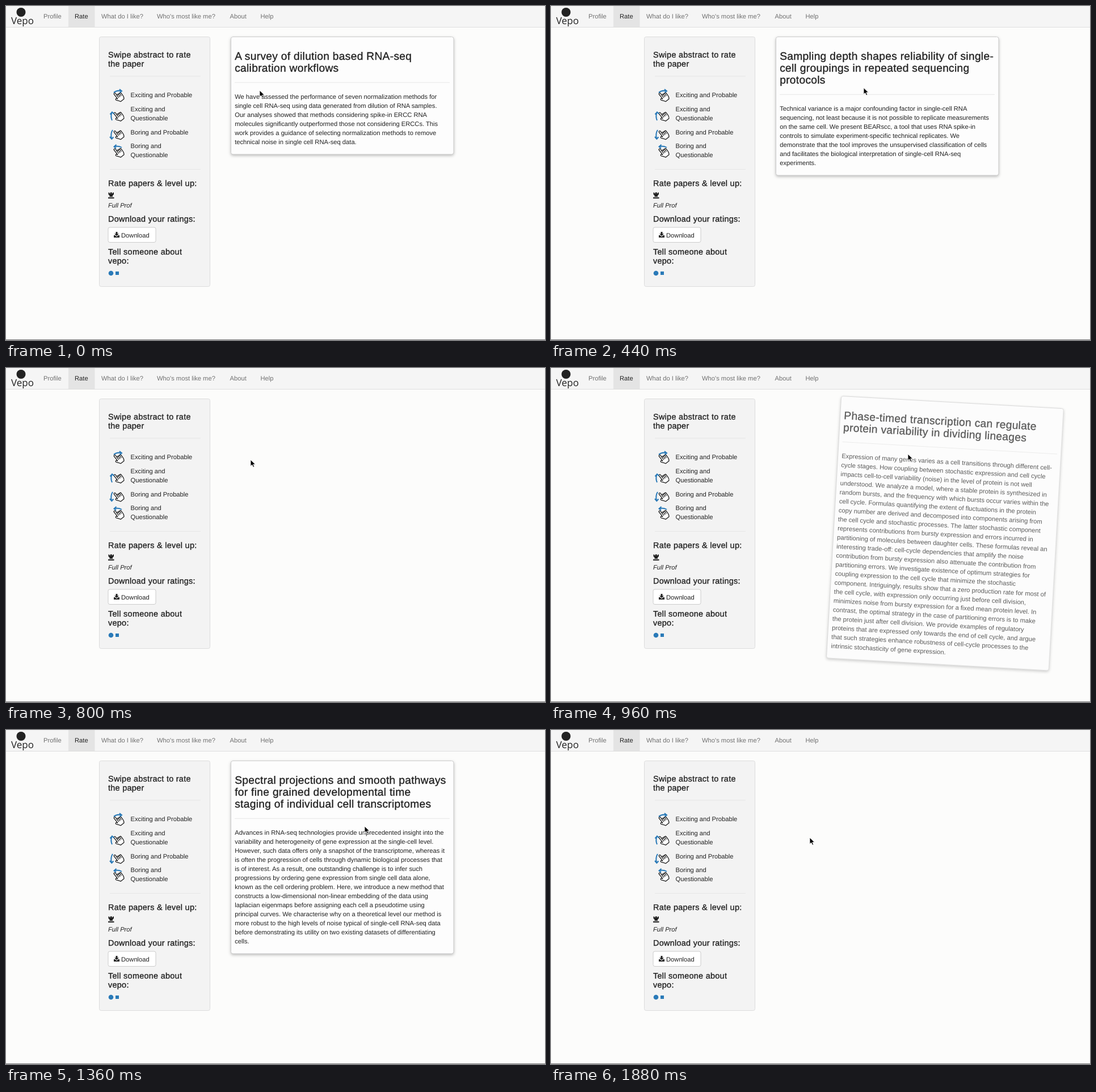
These frames come from a looping animation (950x590 px, 1920 ms). An HTML page:

```html
<!DOCTYPE html>
<html lang="en">
<head>
<meta charset="utf-8">
<title>Swipe to rate</title>
<style>
html, body { margin: 0; width: 100%; height: 100%; overflow: hidden; background: #fcfcfb; }
svg { display: block; }
text { font: 11.2px "Liberation Sans", Arial, sans-serif; fill: #222; white-space: pre; text-rendering: geometricPrecision; }
.h3, .h4 { stroke: #222; stroke-width: .35px; letter-spacing: .3px; }
.h3 { font-size: 19.2px; }
.h4 { font-size: 14.4px; }
.nav { fill: #717171; }
.brand { font: 17px "Open Sans", sans-serif; }
.paper { fill: #fdfdfd; stroke: #ccc; filter: drop-shadow(0 2px 2.5px rgba(0, 0, 0, .25)); }
.rule { stroke: #e6e6e6; }
.arrow { fill: none; stroke: #2a7ab8; stroke-width: 2; }
</style>
</head>
<body>
<svg id="stage" width="950" height="590" viewBox="0 0 950 590">
  <defs>
    <g id="hand" transform="rotate(-38) scale(.86)" fill="#fff" stroke="#1c1c1c" stroke-width="1.5" stroke-linejoin="round" stroke-linecap="round">
      <path d="M-4 3V-9a1.7 1.7 0 0 1 3.4 0V-3a1.6 1.6 0 0 1 3.2 0a1.6 1.6 0 0 1 3.2 .4a1.5 1.5 0 0 1 3 .6V4Q8.800 8 6 11H-2.500Q-4 7-8 3a1.700 1.700 0 0 1 2.500-2.200Z"/>
      <path d="M-.6-3V2M2.600-2.800V2M5.800-2V2" fill="none"/>
    </g>
  </defs>
  <g id="panel"></g>
  <g id="cards"></g>
  <g id="bar"></g>
  <path id="cursor" d="M0 0V11.500L2.700 9L4.700 13.300L6.700 12.400L4.800 8.300H8.600Z" fill="#000" stroke="#fff" stroke-width=".9"/>
</svg>
<script>
const $ = id => document.getElementById(id);
const text = (x, y, s, cls = "", extra = "") => `<text x="${x}" y="${y}" class="${cls}" ${extra}>${s}</text>`;
const lines = (x, y, step, s, cls) => s.split("\n").map((l, i) => text(x, y + i * step, l, cls)).join("");
const rule = (x1, x2, y) => `<path class="rule" d="M${x1} ${y}H${x2}"/>`;
const hand = (x, y) => `<use href="#hand" x="0" y="0" transform="translate(${x} ${y})"/>`;
const arrow = d => `<path class="arrow" d="${d}"/>`;

$("bar").innerHTML = `
  <rect width="950" height="37" fill="#f5f5f5"/><rect x="110" width="46.500" height="37" fill="#e4e4e4"/>
  <path d="M0 37.500H950" stroke="#dedede"/><path d="M0 589.500H950" stroke="#777"/>
  <circle cx="26.500" cy="11" r="8" fill="#222"/>` +
  text(9, 31.5, "Vepo", "brand") +
  [[66, "Profile"], [168, "What do I like?"], [266, "Who's most like me?"], [394.5, "About"], [448.5, "Help"]]
    .map(([x, s]) => text(x, 21.5, s, "nav")).join("") + text(121, 21.5, "Rate");

$("panel").innerHTML = `
  <rect x="164.500" y="54.500" width="195" height="441" rx="3" fill="#f3f3f3" stroke="#dcdcdc"/>` +
  lines(180, 91, 15.6, "Swipe abstract to rate\nthe paper", "h4") +
  rule(183, 343, 124) + rule(183, 343, 288.5) +
  hand(198, 160) + arrow("M190 153Q195 148.500 203 150M200 147L204 150.300L200.500 153") +
  hand(198, 194.5) + arrow("M187 202Q184 196 186.500 188M183.500 191.500L187 187.500L190.500 190.500") +
  hand(198, 227) + arrow("M188 219Q184 225 186 234M183 231L186.300 235L189.500 231.500") +
  hand(198, 258.5) + arrow("M204 250Q198 246.500 191 248.500M194.500 245L190.500 248.500L194 251.500") +
  text(219.5, 161, "Exciting and Probable") +
  lines(219.5, 185.5, 16.4, "Exciting and\nQuestionable") +
  text(219.5, 226.5, "Boring and Probable") +
  lines(219.5, 250.5, 16.4, "Boring and\nQuestionable") +
  text(180, 317.5, "Rate papers &amp; level up:", "h4") +
  `<path d="M180.500 329.500H182.500V331H184V329H186.500V331H188V329.500H190V333L188 334.500V337H182.500V334.500L180.500 333ZM180 338H190.500V340H180Z" fill="#222"/>` +
  text(180, 355.5, "Full Prof", "", 'font-style="italic" style="font-style:italic"') +
  text(180, 380.5, "Download your ratings:", "h4") +
  `<rect x="180" y="391" width="84" height="26.500" rx="3" fill="#fff" stroke="#ccc"/>
   <path d="M193.500 399H196.500V402.500H199L195 406.300L191 402.500H193.500ZM190 405H192L195 407.500L198 405H200V409H190Z" fill="#222"/>` +
  text(203, 408.5, "Download") +
  lines(180, 439, 15.6, "Tell someone about\nvepo:", "h4") +
  `<circle cx="185" cy="472" r="4.300" fill="#2a7ab8"/><rect x="193" y="469" width="6" height="6" fill="#2a7ab8"/>`;

// Each card: visible from `show`, thrown sideways from `swipe` in direction `dir`.
const cards = [
  { show: 0, swipe: 76, dir: 1, title: `A survey of dilution based RNA-seq
calibration workflows`, body: `We have assessed the performance of seven normalization methods for
single cell RNA-seq using data generated from dilution of RNA samples.
Our analyses showed that methods considering spike-in ERCC RNA
molecules significantly outperformed those not considering ERCCs. This
work provides a guidance of selecting normalization methods to remove
technical noise in single cell RNA-seq data.` },
  { show: 360, swipe: 575, dir: -1, title: `Sampling depth shapes reliability of single-
cell groupings in repeated sequencing
protocols`, body: `Technical variance is a major confounding factor in single-cell RNA
sequencing, not least because it is not possible to replicate measurements
on the same cell. We present BEARscc, a tool that uses RNA spike-in
controls to simulate experiment-specific technical replicates. We
demonstrate that the tool improves the unsupervised classification of cells
and facilitates the biological interpretation of single-cell RNA-seq
experiments.` },
  { show: 840, swipe: 892, dir: 1, title: `Phase-timed transcription can regulate
protein variability in dividing lineages`, body: `Expression of many genes varies as a cell transitions through different cell-
cycle stages. How coupling between stochastic expression and cell cycle
impacts cell-to-cell variability (noise) in the level of protein is not well
understood. We analyze a model, where a stable protein is synthesized in
random bursts, and the frequency with which bursts occur varies within the
cell cycle. Formulas quantifying the extent of fluctuations in the protein
copy number are derived and decomposed into components arising from
the cell cycle and stochastic processes. The latter stochastic component
represents contributions from bursty expression and errors incurred in
partitioning of molecules between daughter cells. These formulas reveal an
interesting trade-off: cell-cycle dependencies that amplify the noise
contribution from bursty expression also attenuate the contribution from
partitioning errors. We investigate existence of optimum strategies for
coupling expression to the cell cycle that minimize the stochastic
component. Intriguingly, results show that a zero production rate for most of
the cell cycle, with expression only occurring just before cell division,
minimizes noise from bursty expression for a fixed mean protein level. In
contrast, the optimal strategy in the case of partitioning errors is to make
the protein just after cell division. We provide examples of regulatory
proteins that are expressed only towards the end of cell cycle, and argue
that such strategies enhance robustness of cell-cycle processes to the
intrinsic stochasticity of gene expression.` },
  { show: 1160, swipe: 1529, dir: -1, title: `Spectral projections and smooth pathways
for fine grained developmental time
staging of individual cell transcriptomes`, body: `Advances in RNA-seq technologies provide unprecedented insight into the
variability and heterogeneity of gene expression at the single-cell level.
However, such data offers only a snapshot of the transcriptome, whereas it
is often the progression of cells through dynamic biological processes that
is of interest. As a result, one outstanding challenge is to infer such
progressions by ordering gene expression from single cell data alone,
known as the cell ordering problem. Here, we introduce a new method that
constructs a low-dimensional non-linear embedding of the data using
laplacian eigenmaps before assigning each cell a pseudotime using
principal curves. We characterise why on a theoretical level our method is
more robust to the high levels of noise typical of single-cell RNA-seq data
before demonstrating its utility on two existing datasets of differentiating
cells.` }
];
const LEFT = 396.5, TOP = 54.5, WIDTH = 392.5, THROW = 380, THROW_MS = 200;

for (const c of cards) {
  const head = c.title.split("\n").length * 21.1;
  const height = 69.3 + head + c.body.split("\n").length * 16;
  c.midY = TOP + height / 2;
  c.el = document.createElementNS("http://www.w3.org/2000/svg", "g");
  c.el.innerHTML = `<rect class="paper" x="${LEFT}" y="${TOP}" width="${WIDTH}" height="${height}" rx="3.500"/>` +
    lines(403.2, 95, 21.1, c.title, "h3") + rule(403, 782, 93 + head) +
    lines(403.2, 121.6 + head, 16, c.body);
  $("cards").append(c.el);
}

function drawCard(c, t) {
  const u = Math.min(1, Math.max(0, (t - c.swipe) / THROW_MS));
  const d = c.dir * THROW * u * u * (3 - 2 * u);
  c.el.style.display = t >= c.show && u < 1 ? "" : "none";
  c.el.setAttribute("opacity", 1 - Math.abs(d) / THROW);
  c.el.setAttribute("transform", `rotate(${d / 31.4} ${LEFT + WIDTH / 2} ${c.midY}) translate(${d} 0)`);
}

// Pointer path: time, x, y
const path = [
  [0, 447, 149], [40, 452, 149], [200, 624, 130], [260, 655, 129], [340, 640, 133], [540, 462, 156],
  [600, 443, 157], [800, 431, 162], [880, 470, 160], [1040, 788, 144], [1120, 850, 146], [1200, 840, 150],
  [1480, 476, 185], [1560, 456, 187], [1680, 456, 190], [1920, 456, 190]
];

function drawCursor(t) {
  const i = path.findIndex(p => p[0] > t);
  const [t0, x0, y0] = path[i - 1], [t1, x1, y1] = path[i];
  const u = (t - t0) / (t1 - t0);
  $("cursor").setAttribute("transform", `translate(${x0 + (x1 - x0) * u} ${y0 + (y1 - y0) * u})`);
}

const start = performance.now();
function draw() {
  const t = Math.floor(((performance.now() - start) % 1920) / 40) * 40;
  cards.forEach(c => drawCard(c, t));
  drawCursor(t);
  requestAnimationFrame(draw);
}
draw();
</script>
</body>
</html>
```
